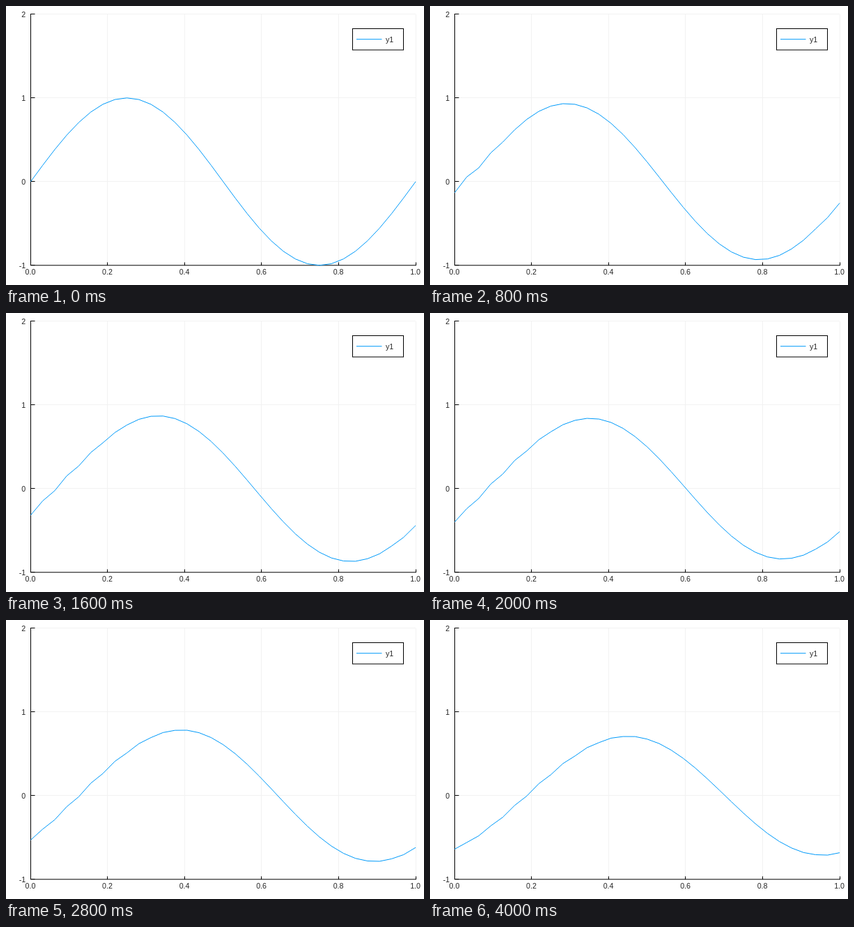
An HTML page that plays this animation: 600 by 400 pixels, repeating every 4.2 s.

```html
<!DOCTYPE html>
<html>
<head>
<meta charset="utf-8">
<style>
  html, body { margin: 0; width: 100%; height: 100%; overflow: hidden; background: #fff; }
  svg { display: block; }
  text { font: 10.67px "Liberation Sans", Arial, sans-serif; fill: #262626; }
  path, rect { fill: none; stroke: #000; stroke-width: 1; }
  #grid { stroke: #f2f2f2; }
  .blue { stroke: #009afa; stroke-linejoin: round; }
</style>
</head>
<body>
<svg width="600" height="400" viewBox="0 0 600 400">
  <path id="grid"/>
  <path id="axes"/>
  <g id="labels"></g>
  <path id="curve" class="blue"/>
  <rect x="497.5" y="32.5" width="73" height="30.5" style="fill:#fff"/>
  <path class="blue" d="M503 47.7H539.5"/>
  <text x="545" y="52">y1</text>
</svg>
<script>
const el = id => document.getElementById(id);
const px = x => 35.4 + 552.6 * x;
const py = y => 251.8 - 120 * y;
const snap = v => Math.floor(v) + 0.5;

// Plot frame
let grid = '', axes = 'M35.5 12V372M35 371.8H588.5', labels = '';
for (let i = 0; i <= 5; i++) {
  const x = snap(px(i / 5));
  if (i) grid += `M${x} 12V371`;
  axes += `M${x} 372V367.5`;
  labels += `<text x="${px(i / 5) - 0.4}" y="385" text-anchor="middle">${(i / 5).toFixed(1)}</text>`;
}
for (let v = -1; v <= 2; v++) {
  const y = snap(py(v));
  if (v > -1) grid += `M36 ${y}H588`;
  axes += `M35 ${y}H41.5`;
  labels += `<text x="28.3" y="${py(v) + 4}" text-anchor="end">${v}</text>`;
}
el('grid').setAttribute('d', grid);
el('axes').setAttribute('d', axes);
el('labels').innerHTML = labels;

// Advection and diffusion on a ring of 33 points, explicit central differences
const N = 33, STEPS = 21, FLOW = 0.32, DIFF = 0.5;
const step = u => u.map((c, j) => {
  const l = u[(j + N - 1) % N], r = u[(j + 1) % N];
  return c - FLOW / 2 * (r - l) + DIFF * (r - 2 * c + l);
});
const toPath = u => 'M' + u.map((v, j) => px(j / (N - 1)).toFixed(2) + ' ' + py(v).toFixed(2)).join('L');

const paths = [];
let u = Array.from({ length: N }, (_, j) => Math.sin(2 * Math.PI * j / (N - 1)));
for (let i = 0; i < STEPS; i++) {
  paths.push(toPath(u));
  u = step(u);
}

const start = performance.now();
function draw(now) {
  const i = Math.floor(Math.max(0, now - start) / 200) % STEPS;
  el('curve').setAttribute('d', paths[i]);
  requestAnimationFrame(draw);
}
draw(start);
</script>
</body>
</html>
```
